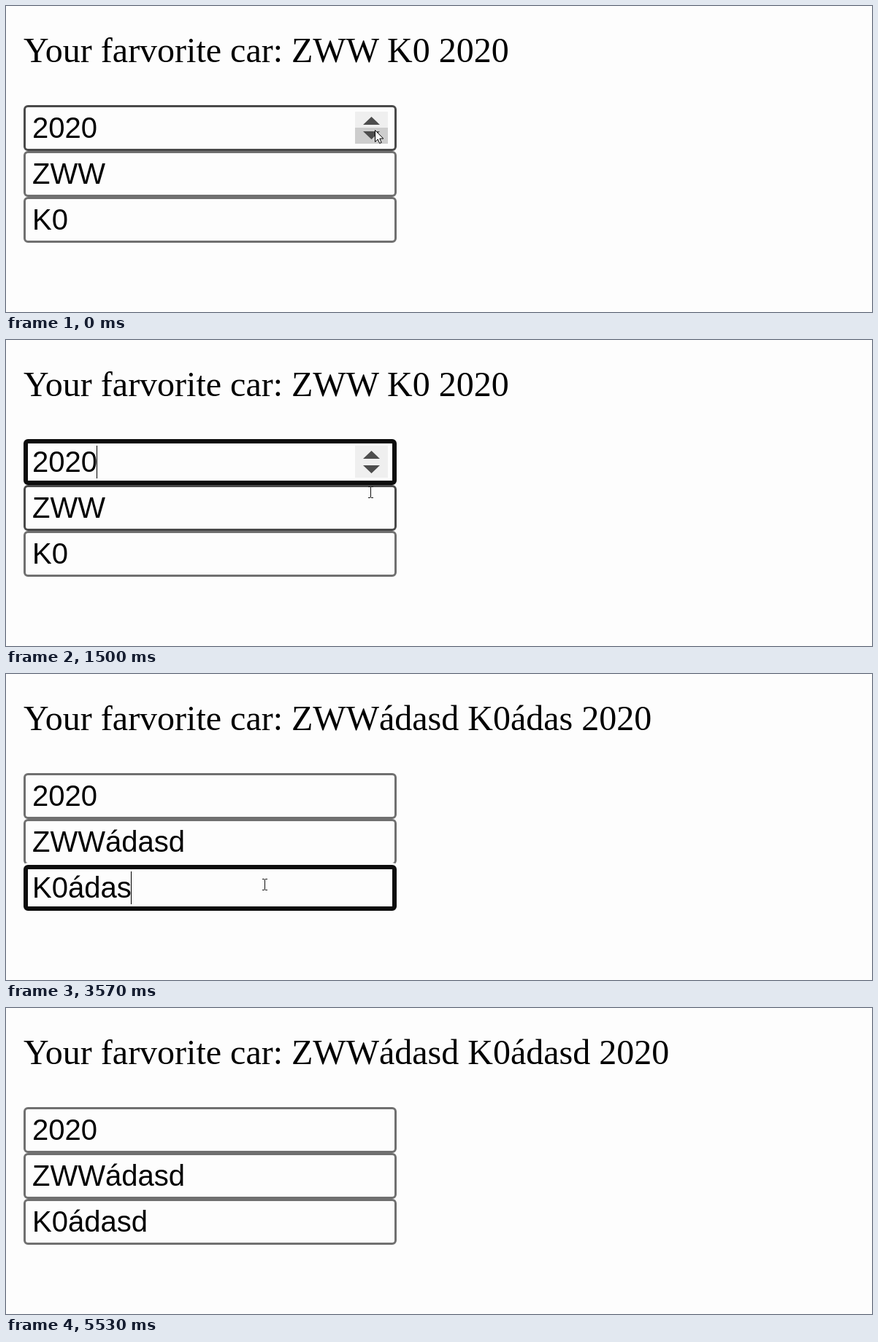
Write an HTML page that moves like this. It is 1186 px wide and 420 px high and loops after 5.61 s.

```html
<!DOCTYPE html>
<html lang="en">
<head>
<meta charset="utf-8">
<title>Favorite car form</title>
<style>
  html, body { margin: 0; width: 100%; height: 100%; overflow: hidden; background: #fdfdfd; }
  svg { display: block; }
  .heading { font: 48px "Liberation Serif", "Times New Roman", serif; }
  .value { font: 40px "Liberation Sans", Arial, sans-serif; }
</style>
</head>
<body>
<svg id="stage" width="1186" height="420" viewBox="0 0 1186 420"></svg>
<script>
const LOOP = 5610, BLINK = 530;
const BG = "#fdfdfd", INK = "#000", BORDER = "#707070", HOVER = "#4a4a4a", FOCUS = "#0d0d0d";
const LEFT = 24, TOP = 136, WIDTH = 511, ROW = 63, RADIUS = 6;
const START = ["2020", "ZWW", "K0"];
const SUFFIXES = ["a", "á", "ád", "áda", "ádas", "ádasd"];

const typing = (row, times) => times.map((t, i) => [t, row, START[row] + SUFFIXES[i]]);

// [time, focused row, new value]
const events = [
  [0, -1],
  [300, 0, "2021"], [470, 0, "2022"], [640, 0, "2023"],
  [980, 0, "2022"], [1130, 0, "2021"], [1280, 0, "2020"],
  [1870, 1], ...typing(1, [2330, 2460, 2560, 2660, 2740, 2820]),
  [3100, 2], ...typing(2, [3270, 3350, 3420, 3490, 3550, 3580]),
  [5530, -1]
];

// [time, x, y] of the pointer
const path = [
  [0, 505, 170], [150, 505, 170], [230, 505, 164], [800, 505, 164],
  [900, 505, 175], [1330, 505, 175], [1500, 499, 209], [1850, 457, 239],
  [2550, 457, 239], [2950, 354, 289], [3600, 354, 289], [3780, 360, 330],
  [4150, 399, 149], [4370, 399, 149], [4630, 410, -20]
];

const svg = document.getElementById("stage");

function add(tag, attrs, parent = svg) {
  const el = document.createElementNS("http://www.w3.org/2000/svg", tag);
  set(el, attrs);
  parent.appendChild(el);
  return el;
}
function set(el, attrs) {
  for (const k in attrs) el.setAttribute(k, attrs[k]);
}
function show(el, on) {
  el.style.display = on ? "" : "none";
}

add("rect", { width: 1186, height: 420, fill: BG });
const heading = add("text", { x: LEFT, y: 77, class: "heading", fill: INK });

const rows = START.map((_, i) => {
  const y = TOP + i * ROW;
  const halo = add("rect", { x: LEFT - 3, y: y - 3, width: WIDTH + 6, height: ROW + 6, rx: 9, fill: BG });
  const box = add("rect", { fill: BG });
  const text = add("text", { x: 36, y: y + 45, class: "value", fill: INK });
  const caret = add("rect", { y: y + 9, width: 1, height: 45, fill: INK });
  return { y, halo, box, text, caret };
});

const spinner = add("g", {});
const halves = [145, 167].map(y => add("rect", { x: 478, y, width: 45, height: 22 }, spinner));
add("path", { d: "M489 163L500.5 152L512 163ZM489 172H512L500.5 183Z", fill: "#4d4d4d" }, spinner);

const arrow = add("path", {
  d: "M.5 .5V16.5L4.2 13L6.7 18.5L9.2 17.4L6.8 12H11.8Z",
  fill: "#fff", stroke: "#000", "stroke-width": 1
});
const beam = add("path", {
  d: "M-3 -7.5H0M1 -7.5H4M.5 -7V7M-3 7.5H0M1 7.5H4",
  fill: "none", stroke: "#111", "stroke-width": 1
});

function pointerAt(t) {
  if (t >= 4800 && t < 4870) return { x: t < 4835 ? 320 : 541, y: 1 };
  if (t >= 4630) return { x: 410, y: -40 };
  const i = path.findIndex(p => p[0] > t);
  const [t0, x0, y0] = path[i - 1], [t1, x1, y1] = path[i];
  const u = (t - t0) / (t1 - t0), e = u * u * (3 - 2 * u);
  return { x: Math.round(x0 + (x1 - x0) * e), y: Math.round(y0 + (y1 - y0) * e) };
}

function formAt(t) {
  const form = { values: [...START], focus: -1, since: 0 };
  for (const [time, row, value] of events) {
    if (time > t) break;
    form.focus = row;
    form.since = time;
    if (value) form.values[row] = value;
  }
  return form;
}

function drawRow(row, i, form, hovered, t) {
  const focused = form.focus === i, w = focused ? 6 : 3;
  const caretOn = focused && (t - form.since) % (2 * BLINK) < BLINK;
  show(row.halo, focused);
  set(row.box, {
    x: LEFT + w / 2, y: row.y + w / 2, width: WIDTH - w, height: ROW - w,
    rx: RADIUS - w / 2, "stroke-width": w,
    stroke: focused ? FOCUS : hovered ? HOVER : BORDER
  });
  row.text.textContent = form.values[i];
  show(row.caret, caretOn);
  if (caretOn) set(row.caret, { x: Math.floor(36 + row.text.getComputedTextLength()) });
}

function draw(t) {
  const form = formAt(t), { x, y } = pointerAt(t);
  const [year, brand, model] = form.values;
  heading.textContent = `Your farvorite car: ${brand} ${model} ${year}`;

  const inside = x >= LEFT && x < LEFT + WIDTH;
  const over = inside ? Math.floor((y - TOP) / ROW) : -1;
  rows.forEach((row, i) => drawRow(row, i, form, over === i, t));

  const onSpinner = x >= 478 && x < 523 && y >= 145 && y < 189;
  show(spinner, over === 0 || form.focus === 0);
  halves.forEach((half, i) => {
    const lit = onSpinner && (y >= 167) === (i === 1);
    set(half, { fill: lit ? "#cdcdcd" : "#efefef" });
  });

  const onText = !onSpinner && ((over >= 0 && over < 3) || (y > 36 && y < 90));
  show(arrow, !onText);
  show(beam, onText);
  set(onText ? beam : arrow, { transform: `translate(${x} ${y})` });
}

const begin = performance.now();
function tick() {
  draw((performance.now() - begin) % LOOP);
  requestAnimationFrame(tick);
}
tick();
</script>
</body>
</html>
```
